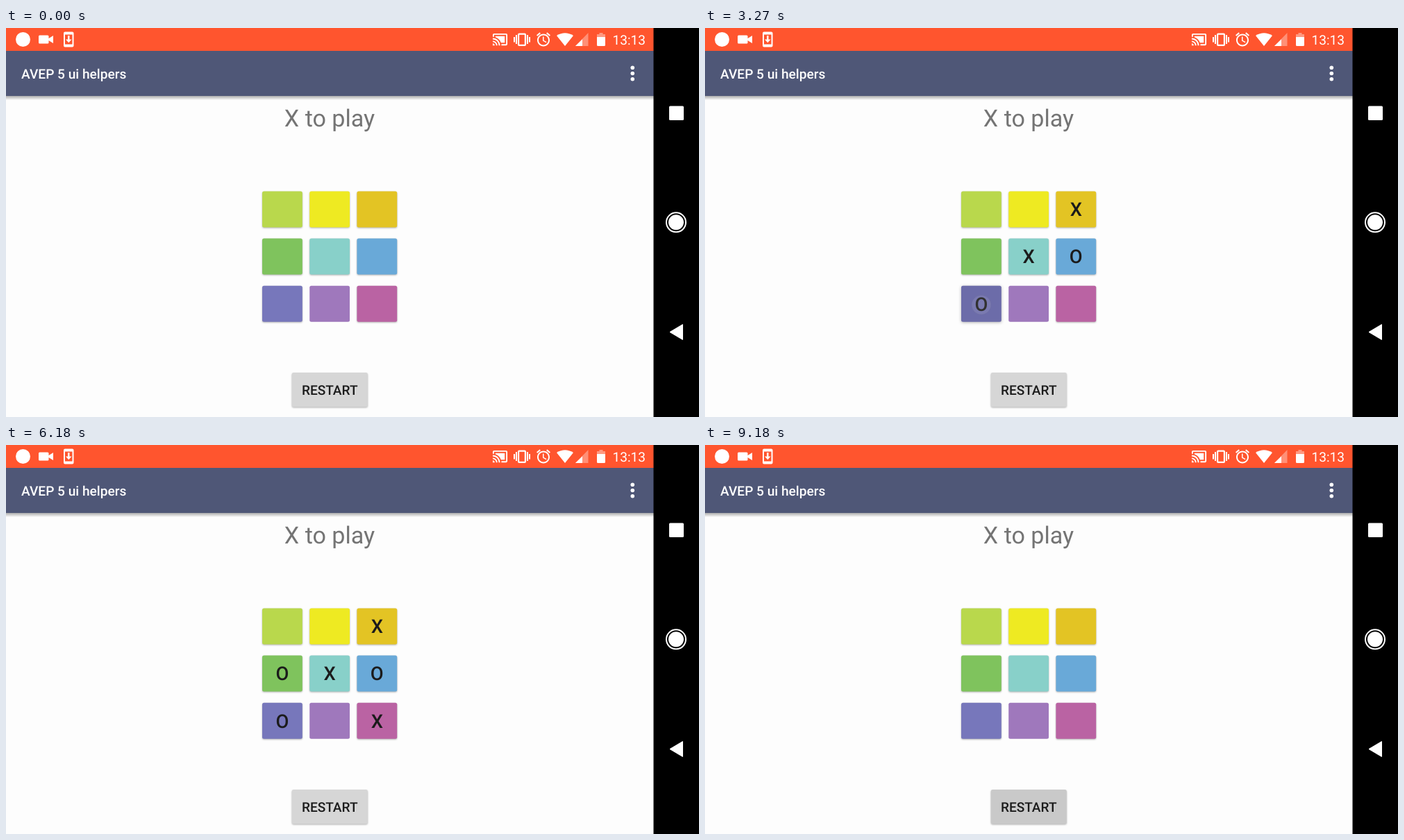
An HTML page for the animation above (9.2 s loop, 998 px wide and 561 px high).

```html
<!DOCTYPE html>
<html lang="en">
<head>
<meta charset="utf-8">
<title>Noughts and crosses</title>
<style>
html, body { margin: 0; width: 100%; height: 100%; overflow: hidden; background: #000; }
svg { display: block; font-family: Roboto, sans-serif; text-rendering: geometricPrecision; }
.mid { text-anchor: middle; }
.med { font-weight: 500; }
</style>
</head>
<body>
<svg id="stage" width="998" height="561" viewBox="0 0 998 561">
  <defs>
    <linearGradient id="shade" x2="0" y2="1">
      <stop offset="0" stop-opacity=".32"/>
      <stop offset="1" stop-opacity="0"/>
    </linearGradient>
  </defs>
  <rect width="933" height="561" fill="#fdfdfd"/>
  <rect y="98" width="933" height="6" fill="url(#shade)"/>
  <rect y="32" width="933" height="66" fill="#4f5777"/>
  <rect width="933" height="33" fill="#ff552e"/>
  <rect x="932.5" width="65.5" height="561" fill="#000"/>

  <g fill="#fff">
    <circle cx="24.5" cy="16.5" r="10.5"/>
    <path d="M48.5 10.5h11.5q1.5 0 1.5 1.5v3l6.5-4v11l-6.5-4v3q0 1.500-1.500 1.500h-11.500q-1.500 0-1.500-1.500v-9q0-1.500 1.500-1.500z"/>
    <path fill-rule="evenodd" d="M85 5.500h10.500q2 0 2 2v18q0 2-2 2h-10.500q-2 0-2-2v-18q0-2 2-2zm0 4v14h10.500v-14z"/>
    <path d="M89 11h2.500v5.500h3l-4.250 4.800-4.250-4.800h3z"/>
    <path transform="translate(700 5) scale(.96)" d="M21 3H3c-1.100 0-2 .9-2 2v3h2V5h18v14h-7v2h7c1.100 0 2-.9 2-2V5c0-1.100-.9-2-2-2zM1 18v3h3c0-1.660-1.340-3-3-3zm0-4v2c2.760 0 5 2.240 5 5h2c0-3.870-3.130-7-7-7zm0-4v2c4.970 0 9 4.030 9 9h2c0-6.080-4.930-11-11-11zM19 7H5v1.630c3.960 1.280 7.090 4.410 8.370 8.370H19V7z"/>
    <path fill-rule="evenodd" d="M739 7.500h8q2 0 2 2v14.500q0 2-2 2h-8q-2 0-2-2v-14.500q0-2 2-2zm.2 2.200v14h7.600v-14z"/>
    <path d="M734 10h2v13h-2zM731 13h2v7.500h-2zM750 10h2v13h-2zM753 13h2v7.500h-2z"/>
    <path transform="translate(762 4.500)" d="M22 5.720l-4.600-3.860-1.290 1.530 4.600 3.860zM7.880 3.390L6.600 1.860 2 5.710l1.290 1.530zM12.500 8H11v6l4.750 2.850.75-1.230-4-2.370zM12 4c-4.970 0-9 4.030-9 9s4.020 9 9 9c4.970 0 9-4.030 9-9s-4.030-9-9-9zm0 16c-3.870 0-7-3.130-7-7s3.130-7 7-7 7 3.130 7 7-3.130 7-7 7z"/>
    <path d="M793 11q12-7.500 24 0l-12 15z"/>
    <path opacity=".35" d="M838.500 7v19h-18.500z"/>
    <path d="M830 16.200v9.800h-10z"/>
    <path opacity=".4" d="M851 9h3.500v-2h5v2h3.500v5h-12z"/>
    <path d="M851 13h12v11.500q0 1.500-1.500 1.500h-9q-1.500 0-1.500-1.500z"/>
    <text x="873.500" y="23.500" font-size="19.100">13:13</text>
    <text class="med" x="22" y="72.800" font-size="19.100">AVEP 5 ui helpers</text>
    <circle cx="902.300" cy="57.300" r="2.800"/>
    <circle cx="902.300" cy="65.500" r="2.800"/>
    <circle cx="902.300" cy="73.700" r="2.800"/>
    <rect x="955" y="112.500" width="21" height="20.500" rx="1.500"/>
    <circle cx="965" cy="280.300" r="11"/>
    <circle cx="965" cy="280.300" r="14" fill="none" stroke="#fff" stroke-width="2"/>
    <path d="M956 438.500l18.500-11v22z" stroke="#fff" stroke-linejoin="round"/>
  </g>
  <text id="status" class="mid" x="466" y="141.500" font-size="34.100" fill="#747474"></text>
  <g id="buttons"></g>
  <circle id="touch" r="14" fill="#fff" fill-opacity=".72" stroke="#777" stroke-opacity=".6" stroke-width="1.200"/>
</svg>
<script>
const LOOP = 9200, FADE = 450, GROW = 220, RESTART = 9;
const COLOURS = ['#b9d84c', '#eeea22', '#e3c424', '#7fc35d', '#88d0c9', '#69a9d8', '#7777bb', '#9f78bc', '#ba63a3'];
// button, finger down, finger up
const TAPS = [
  [2, 60, 140], [5, 1300, 1430], [4, 2390, 2490], [6, 3070, 3180], [8, 3790, 3900],
  [3, 5560, 5720], [1, 6350, 6480], [0, 7250, 7400], [RESTART, 8830, 8950]
];
const RESET = TAPS[8][2], WIN = TAPS[7][2];

const byId = id => document.getElementById(id);
const clamp = v => Math.min(1, Math.max(0, v));

function add(parent, tag, attrs) {
  const el = document.createElementNS('http://www.w3.org/2000/svg', tag);
  for (const k in attrs) el.setAttribute(k, attrs[k]);
  parent.appendChild(el);
  return el;
}

function makeButton(id, x, y, w, h, fill, size, label) {
  const box = { x, y, width: w, height: h, rx: 2.5 };
  const cx = x + w / 2, cy = y + h / 2;
  const g = add(byId('buttons'), 'g', {});
  const clip = add(g, 'clipPath', { id: 'clip' + id });
  add(clip, 'rect', box);
  const face = add(g, 'rect', { ...box, fill });
  const wrap = add(g, 'g', { 'clip-path': `url(#clip${id})` });
  const ripple = add(wrap, 'circle', { cx, cy });
  const text = add(g, 'text', { class: 'mid med', x: cx, y: cy + size * .36, 'font-size': size, fill: '#1b1b1b' });
  text.textContent = label;
  return { cx, cy, face, ripple, text, reach: Math.hypot(w, h) / 2 };
}

const buttons = COLOURS.map((c, i) =>
  makeButton(i, 369 + i % 3 * 68.2, 235.4 + Math.floor(i / 3) * 68.2, 57.8, 52, c, 27.3, ''));
buttons.push(makeButton(RESTART, 411.8, 497, 109, 49.5, '#d6d6d6', 19.1, 'RESTART'));

function draw(t) {
  const live = t < RESET;
  let turn = 0, spot = 0;
  TAPS.forEach(([id, down, up], i) => {
    const b = buttons[id];
    const done = t >= up;
    if (id !== RESTART) {
      b.text.textContent = done && live ? 'XO'[i % 2] : '';
      if (done) turn = i + 1;
    }
    const grow = clamp((t - down) / GROW);
    const fade = 1 - clamp((t - up) / FADE);
    b.ripple.setAttribute('r', b.reach * (1 - (1 - grow) ** 2));
    b.ripple.setAttribute('opacity', .12 * clamp((t - down) / 80) * fade);

    const lift = clamp((t - down) / 100) * (1 - clamp((t - up) / 150));
    const drop = 1.3 + 1.7 * lift;
    b.face.style.filter = `drop-shadow(0 ${drop}px ${drop}px rgba(0,0,0,.3))`;

    if (t > down && t < up + 120) {
      spot = .55 * (1 - clamp((t - up) / 120));
      byId('touch').setAttribute('cx', b.cx);
      byId('touch').setAttribute('cy', b.cy + 1.5);
    }
  });
  byId('touch').setAttribute('opacity', spot);
  byId('status').textContent = live && t >= WIN ? 'O WINS!' : (live ? 'XO'[turn % 2] : 'X') + ' to play';
}

const start = performance.now();
function tick() {
  draw((performance.now() - start) % LOOP);
  requestAnimationFrame(tick);
}
draw(0);
requestAnimationFrame(tick);
</script>
</body>
</html>
```
